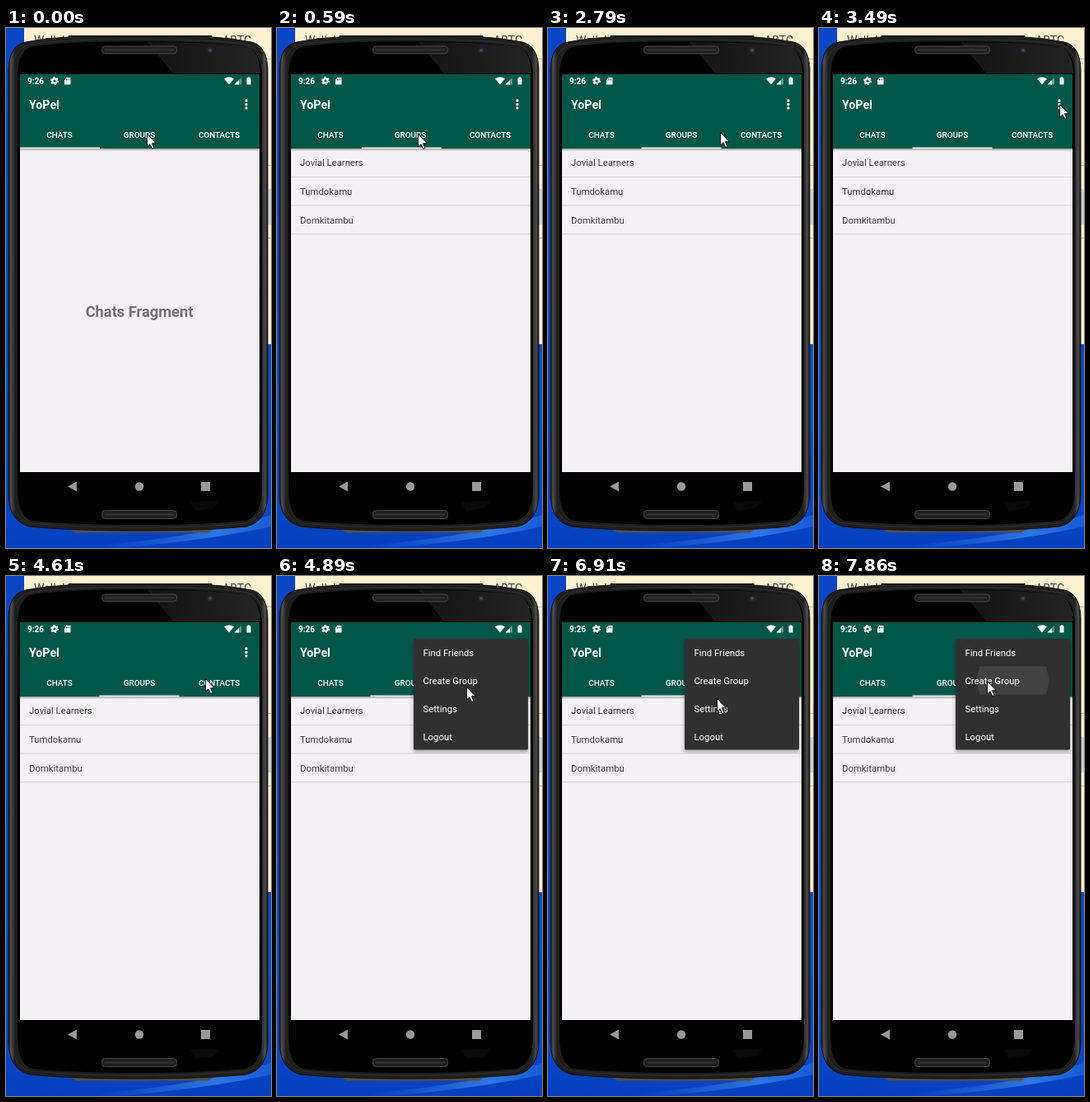
These frames come from a looping animation (322 px wide and 630 px high, 7.99 s). An HTML page:

```html
<!DOCTYPE html>
<html lang="en">
<head>
<meta charset="utf-8">
<title>Tabs and overflow menu</title>
<style>
  html, body { margin: 0; width: 100%; height: 100%; overflow: hidden; background: #0a43bd; }
  svg { display: block; width: 100%; height: 100%; font-family: Roboto, "Noto Sans", sans-serif; }
  .white { fill: #fff; }
  .medium { font-weight: 500; }
  .bold { font-weight: 600; }
  .tab { font-size: 9.9px; text-anchor: middle; }
  .row { font-size: 11.33px; }
  #groups text { fill: #3b3b3b; }
</style>
</head>
<body>
<svg viewBox="0 0 322 630" xmlns="http://www.w3.org/2000/svg">
  <defs>
    <linearGradient id="sky" x2="0" y2="1">
      <stop offset="0" stop-color="#0a46c4"/>
      <stop offset=".75" stop-color="#0a50d2"/>
      <stop offset="1" stop-color="#0640be"/>
    </linearGradient>
    <linearGradient id="streak">
      <stop offset=".2" stop-color="#2f7fee" stop-opacity="0"/>
      <stop offset=".75" stop-color="#3f8df2"/>
      <stop offset="1" stop-color="#1c66de"/>
    </linearGradient>
    <linearGradient id="rim">
      <stop offset="0" stop-color="#141414"/>
      <stop offset=".01" stop-color="#505050"/>
      <stop offset=".025" stop-color="#1e1e1e"/>
      <stop offset=".975" stop-color="#1e1e1e"/>
      <stop offset=".99" stop-color="#505050"/>
      <stop offset="1" stop-color="#141414"/>
    </linearGradient>
    <linearGradient id="gloss">
      <stop offset="0" stop-color="#141414"/>
      <stop offset="1" stop-color="#232323"/>
    </linearGradient>
    <linearGradient id="barShadow" x2="0" y2="1">
      <stop offset="0" stop-color="#8f9492"/>
      <stop offset="1" stop-color="#f3f1f3"/>
    </linearGradient>
    <filter id="soft" x="-10%" y="-10%" width="120%" height="120%"><feGaussianBlur stdDeviation="2.5"/></filter>
    <clipPath id="screenClip"><rect x="17" y="146" width="291" height="392"/></clipPath>
    <clipPath id="tabClip"><rect x="113.500" y="112" width="97" height="34"/></clipPath>
    <clipPath id="itemClip"><rect x="166" y="109.500" width="139" height="34"/></clipPath>
    <clipPath id="menuClip"><rect id="reveal" y="60" width="180"/></clipPath>
  </defs>

  <!-- desktop -->
  <rect width="322" height="630" fill="url(#sky)"/>
  <path d="M60 630Q220 622 322 590V604Q240 622 130 630Z" fill="url(#streak)" opacity=".7"/>
  <rect x="22" width="300" height="383" fill="#fdf1d1"/>
  <path d="M316 37.500H322M316 166.500H322M316 254.500H322" stroke="#c9bd97"/>
  <rect x="316" y="195" width="6" height="43" fill="#d5d2cb"/>
  <g font-size="14" fill="#444">
    <text x="34" y="20">Wallabi</text>
    <text x="298" y="20" text-anchor="end">ABTC</text>
  </g>

  <!-- phone -->
  <path d="M75 606H255L245 611.500H85Z" fill="#54504b"/>
  <path d="M3 50Q4 21 24 17Q50 12 76 11V9.500H250V11Q272 12 298 17Q317 21 318 50V566Q317 598 292 604Q245 609 161 609Q77 609 29 604Q4 598 3 566Z" fill="url(#rim)" stroke="#111"/>
  <path d="M7 60Q7 26 27 20.500Q60 13.500 161 13.500Q262 13.500 294 20.500Q314 26 314 60V560Q314 595 291 600Q240 605 161 605Q82 605 30 600Q7 595 7 560Z" fill="none" stroke="#383838" stroke-width=".8"/>
  <path d="M14 60Q14 30 29 23Q70 16 161 16Q252 16 293 23Q311 30 311 60V558Q311 591 291 597Q240 602 161 602Q82 602 31 597Q14 591 14 558Z" fill="#000"/>
  <path d="M172 17Q252 17 294 23Q308 30 309 55H203Z" fill="url(#gloss)"/>
  <path d="M224 574L260 573L252 582L230 585Z" fill="#080808"/>
  <g fill="#202020" stroke="#484848">
    <rect x="116.500" y="22" width="91" height="9" rx="4"/>
    <rect x="116.500" y="584.500" width="91" height="10" rx="4"/>
  </g>
  <path d="M120 26.500H204M120 589.500H204" stroke="#333" stroke-width="2"/>
  <circle cx="248" cy="27" r="4" fill="#20242f"/>
  <circle cx="248" cy="27" r="2" fill="#3b4468"/>

  <!-- pages -->
  <rect x="17" y="56" width="291" height="482" fill="#f3f1f3"/>
  <g clip-path="url(#screenClip)">
    <text id="chats" x="162" y="349.500" font-size="18.300" font-weight="700" fill="#707070" text-anchor="middle">Chats Fragment</text>
    <g id="groups" class="row">
      <text x="28" y="167.300">Jovial Learners</text>
      <text x="28" y="202">Tumdokamu</text>
      <text x="28" y="236.800">Domkitambu</text>
      <path d="M17 180.500H308M17 215H308M17 249.500H308" stroke="#d5d3d5" stroke-width="1.200"/>
    </g>
  </g>

  <!-- status bar, toolbar, tabs -->
  <rect x="17" y="146" width="291" height="3" fill="url(#barShadow)"/>
  <rect x="17" y="56" width="291" height="90" fill="#005748"/>
  <g class="white medium">
    <text class="bold" x="26" y="67.700" font-size="10">9:26</text>
    <text class="bold" x="28" y="98" font-size="14.200">YoPel</text>
    <circle cx="59" cy="64" r="2.700" fill="none" stroke="#fff" stroke-width="2.200"/>
    <circle cx="59" cy="64" r="4.300" fill="none" stroke="#fff" stroke-width="1.400" stroke-dasharray="2.250"/>
    <path d="M73.500 60H78.500V68.500H71V62.500Z"/>
    <path d="M73.500 61.500V63.500M75.200 61.500V63.500M77 61.500V63.500" stroke="#005748" stroke-width=".8"/>
    <path d="M265 61.500Q271 57.500 277 61.500L271 68.500Z"/>
    <path d="M286 60V68.500H277.500Z" opacity=".4"/>
    <path d="M283 63V68.500H277.500Z"/>
    <path d="M292.500 60.500H293.700V59.500H296.300V60.500H297.500V68.500H292.500Z"/>
    <path d="M292 88V98" stroke="#fff" stroke-width="3.300" stroke-linecap="round" stroke-dasharray="0 4.500"/>
    <circle id="dotsRipple" cx="292" cy="92" opacity=".17"/>
    <circle id="tabRipple" cx="171" cy="129" opacity=".17" clip-path="url(#tabClip)"/>
    <text class="tab" x="65" y="133">CHATS</text>
    <text class="tab" x="162" y="133">GROUPS</text>
    <text class="tab" x="259" y="133">CONTACTS</text>
  </g>
  <rect id="indicator" x="17" y="144.500" width="97" height="2" fill="#e3e3e3"/>

  <!-- navigation bar -->
  <g fill="#999">
    <path d="M75 555.500L86 549.500V561.500Z"/>
    <circle cx="162" cy="555.500" r="5.200"/>
    <rect x="237" y="550" width="11" height="11"/>
  </g>

  <!-- overflow menu -->
  <g id="menu" clip-path="url(#menuClip)">
    <rect x="166" y="79" width="139" height="134" fill="#000" opacity=".35" filter="url(#soft)"/>
    <rect x="166" y="76" width="139" height="134.500" rx="1.500" fill="#303030"/>
    <circle id="itemRipple" cx="235.500" cy="126.500" fill="#424242" clip-path="url(#itemClip)"/>
    <g class="white row">
      <text x="177.500" y="96.700">Find Friends</text>
      <text x="177.500" y="130.700">Create Group</text>
      <text x="177.500" y="164.700">Settings</text>
      <text x="177.500" y="198.700">Logout</text>
    </g>
  </g>

  <path id="cursor" d="M.5 .5V16L4 12.800L6.700 18.500L9 17.500L6.500 11.800H11.300Z" fill="#fff" stroke="#000" stroke-width=".9"/>
</svg>

<script>
const LOOP = 7990;
const FRAME = 130;
const PAGE = 291;
const TAB = 96.5;
const $ = id => document.getElementById(id);

// Pointer gestures: start time, length in frames, destination.
const home = [171, 128];
const gestures = [
  [1920, 1, 140, 151],
  [2070, 2, 114, 160],
  [2780, 2, 303, 92],
  [3060, 1, 311, 90],
  [3210, 3, 292, 92],
  [4460, 2, 242, 124],
  [4740, 2, 230, 134],
  [5020, 3, 222, 149],
  [5440, 3, 209, 145],
  [5820, 3, 211, 111],
  [6240, 4, 205, 162],
  [6770, 5, 204, 127]
];

// Progress from 0 to 1 that advances in whole frames.
function ramp(t, start, frames) {
  const done = Math.floor((t - start) / FRAME) + 1;
  return Math.min(Math.max(done / frames, 0), 1);
}
const easeOut = (p, power = 1.4) => 1 - (1 - p) ** power;

function set(id, attributes) {
  for (const name in attributes) $(id).setAttribute(name, attributes[name]);
}
const move = (id, x, y = 0) => set(id, { transform: `translate(${x} ${y})` });

function ripple(id, t, start, end, size) {
  const active = t >= start && t < end;
  set(id, { r: active ? size * easeOut(ramp(t, start, 2)) : 0 });
}

function pointer(t) {
  let [x, y] = home;
  for (const [start, frames, toX, toY] of gestures) {
    const p = ramp(t, start, frames);
    x += (toX - x) * p;
    y += (toY - y) * p;
  }
  return [Math.round(x), Math.round(y)];
}

function draw(t) {
  const page = PAGE * easeOut(ramp(t, 440, 2));
  move("chats", -page);
  move("groups", PAGE - page);
  move("indicator", TAB * easeOut(ramp(t, 440, 3), 2));
  move("cursor", ...pointer(t));

  ripple("tabRipple", t, 280, 590, 90);
  ripple("dotsRipple", t, 4190, 4460, 14);
  ripple("itemRipple", t, 7860, LOOP, 70);

  // The menu unfolds from its top right corner.
  const open = easeOut(ramp(t, 4740, 2));
  set("reveal", { x: 310 - 180 * open, height: open && 60 + 110 * open - 15 });
}

const start = performance.now();
function tick() {
  draw((performance.now() - start) % LOOP);
  requestAnimationFrame(tick);
}
tick();
</script>
</body>
</html>
```
